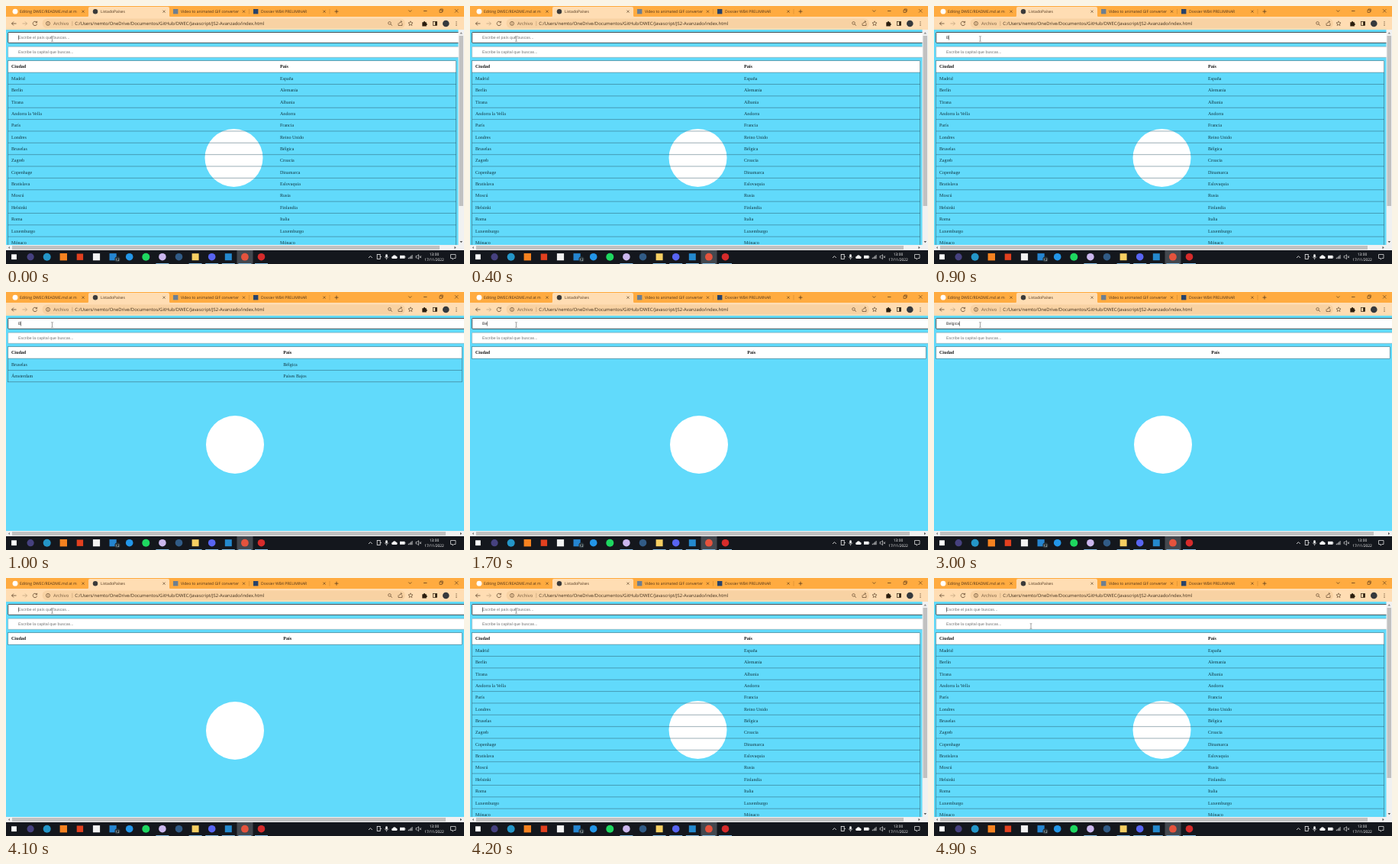
An HTML page that plays this animation: 600 px wide and 338 px high, repeating every 5 s.

```html
<!DOCTYPE html>
<html lang="es">
<head>
<meta charset="utf-8">
<title>ListadoPaíses</title>
<style>
  html, body { margin: 0; width: 100%; height: 100%; overflow: hidden; background: #61dafb; }
  svg { display: block; width: 600px; height: 338px; text-rendering: geometricPrecision; }
  .ui { font-family: "Open Sans", "Noto Sans", sans-serif; }
  .field { font-family: "Liberation Sans", Arial, sans-serif; font-size: 5.28px; }
  .cell { font-family: "Liberation Serif", "Times New Roman", serif; font-size: 6.05px; }
</style>
</head>
<body>
<svg id="stage" viewBox="0 0 600 338" xmlns="http://www.w3.org/2000/svg">
  <g id="page"></g>
  <g id="input"></g>
  <g id="chrome"></g>
  <g id="taskbar"></g>
  <g id="mouse" fill="none" stroke="#555" stroke-width=".55">
    <path d="M-1.3-3.4Q0-3.4 0-2.8Q0-3.4 1.3-3.4M0-2.8V2.8M-1.3 3.4Q0 3.4 0 2.8Q0 3.4 1.3 3.4"/>
  </g>
</svg>
<script>
const NS = "http://www.w3.org/2000/svg";
const LOOP = 5000;
const $ = id => document.getElementById(id);

function add(parent, tag, attrs, content) {
  const el = document.createElementNS(NS, tag);
  for (const key in attrs) el.setAttribute(key, attrs[key]);
  if (content !== undefined) el.textContent = content;
  parent.appendChild(el);
  return el;
}
const rect = (g, x, y, width, height, fill, more) =>
  add(g, "rect", { x, y, width, height, fill, ...more });
const disc = (g, cx, cy, r, fill, more) => add(g, "circle", { cx, cy, r, fill, ...more });
const label = (g, x, y, content, cls, more) => add(g, "text", { x, y, class: cls, ...more }, content);
const line = (g, d, stroke, width = 0.7) =>
  add(g, "path", { d, stroke, fill: "none", "stroke-width": width });

const CITIES = [
  ["Madrid", "España"], ["Berlín", "Alemania"], ["Tirana", "Albania"],
  ["Andorra la Vella", "Andorra"], ["París", "Francia"], ["Londres", "Reino Unido"],
  ["Bruselas", "Bélgica"], ["Zagreb", "Croacia"], ["Copenhage", "Dinamarca"],
  ["Bratislava", "Eslovaquia"], ["Moscú", "Rusia"], ["Helsinki", "Finlandia"],
  ["Roma", "Italia"], ["Luxemburgo", "Luxemburgo"], ["Mónaco", "Mónaco"]
];
const LISTS = {
  all: CITIES,
  some: [["Bruselas", "Bélgica"], ["Ámsterdam", "Países Bajos"]],
  none: []
};

function scrollbars(g, tall, right) {
  rect(g, 0, 313, 600, 7, "#f1f1f1");
  rect(g, 8, 314, tall ? 560 : 568, 5, "#c1c1c1");
  add(g, "path", { d: "M5 314.7v3.6l-2.2-1.8z", fill: "#888" });
  add(g, "path", { d: `M${right - 5} 314.7v3.6l2.2-1.8z`, fill: "#555" });
  if (!tall) return;
  rect(g, 592.5, 31, 7.5, 282, "#f1f1f1");
  rect(g, 593.5, 39, 5.5, 223, "#c1c1c1");
  add(g, "path", { d: "M594.5 36.5h3.6l-1.8-2.2z", fill: "#888" });
  add(g, "path", { d: "M594.5 308h3.6l-1.8 2.2z", fill: "#555" });
}

function buildPage(name) {
  const rows = LISTS[name], tall = name === "all";
  const right = tall ? 592.5 : 600;
  const width = tall ? 587 : 594.5;
  const second = tall ? 359 : 363.3;
  const rowH = 15.36, left = 2.7, top = 71.8, ink = "#12343f";
  const g = add($("page"), "g", {});
  rect(g, 0, 31, 600, 289, "#61dafb");
  disc(g, tall ? 298.5 : 300, tall ? 199 : 200, 38, "#fff");

  rect(g, left, 34.5, 640, 13.8, "#fff", { rx: 0.9, stroke: "#1c1c1c", "stroke-width": 0.75 });
  rect(g, left, 53.3, 640, 14, "#fff", { rx: 0.7, stroke: "#909090", "stroke-width": 0.45 });
  label(g, 16, 62, "Escribe la capital que buscas...", "field", { fill: "#757575" });

  rect(g, left, top, width, rowH, "#fff");
  const bold = { fill: "#111", "font-weight": 700 };
  label(g, 7, 81.3, "Ciudad", "cell", bold);
  label(g, second, 81.3, "País", "cell", bold);
  rows.forEach((row, i) => {
    const y = top + (i + 1) * rowH;
    label(g, 7, y + 9.7, row[0], "cell", { fill: ink });
    label(g, second, y + 9.7, row[1], "cell", { fill: ink });
    line(g, `M${left} ${y}h${width}`, "#24505f", 0.45);
  });
  rect(g, left, top, width, rowH * (rows.length + 1), "none",
    { stroke: "#2c464f", "stroke-width": 0.45 });
  scrollbars(g, tall, right);
  return g;
}

function buildBrowser() {
  const g = $("chrome"), ink = "#4a321a", bar = "#ffddb3";
  rect(g, 0, 0, 600, 15, "#ffab40");
  rect(g, 0, 14, 600, 17, bar);
  add(g, "path", { d: "M106 14.5q2 0 2-2V3q0-2 2-2h102q2 0 2 2v9.5q0 2 2 2z", fill: bar });

  const tabs = [
    [18, "Editing DWEC/README.md at m"], [124, "ListadoPaíses"],
    [229, "Video to animated GIF converter"], [334, "Dossier WB4 PRELIMINAR"]
  ];
  tabs.forEach(([x, title], i) => {
    label(g, x, 9, title, "ui", { fill: ink, "font-size": 5.05 });
    const cx = [101, 207, 311.5, 417][i];
    line(g, `M${cx - 1.6} 5.6l3.2 3.2m0-3.2l-3.2 3.2`, ink, 0.6);
  });
  disc(g, 12, 7.2, 3.4, "#fff");
  disc(g, 117, 7.2, 3.2, "#3a3a3a");
  rect(g, 219, 4, 6.4, 6.4, "#6d7f91");
  rect(g, 324, 4, 6.4, 6.4, "#27436b");
  line(g, "M318.5 4v6.5M424 4v6.5", "#c5812a", 0.5);
  line(g, "M430.5 7.2h5M433 4.7v5", ink);

  line(g, "M527.3 5.5l2 2 2-2M547 6.5h4.5", ink);
  line(g, "M568 5.2h3.2v3.2h-3.2zM569 5v-1h3.3v3.2h-1M588 4.2l4.4 4.4m0-4.4l-4.4 4.4", ink, 0.6);

  line(g, "M13.5 23h-6m2.5-2.5L7.5 23l2.5 2.5", ink);
  line(g, "M21.5 23h6m-2.5-2.5l2.5 2.5-2.5 2.5", "#b99b78");
  line(g, "M40 21.2a2.7 2.7 0 1 0 .6 2.3M40.6 19.8v2h-2", ink);
  rect(g, 47.5, 16.5, 475.5, 12.6, "#f8d2a3", { rx: 6.3 });
  disc(g, 55, 22.9, 2.5, "none", { stroke: ink, "stroke-width": 0.6 });
  line(g, "M55 22.4v1.9M55 21.2v.6", ink, 0.6);
  label(g, 62, 25, "Archivo", "ui", { fill: "#75593b", "font-size": 5.85 });
  line(g, "M86.8 19.8v6.2", "#b5946c", 0.5);
  label(g, 90.3, 25,
    "C:/Users/nemto/OneDrive/Documentos/GitHub/DWEC/Javascript/JS2-Avanzado/index.html",
    "ui", { fill: "#3d2c1a", "font-size": 5.9 });

  disc(g, 502.5, 22.4, 1.8, "none", { stroke: ink, "stroke-width": 0.6 });
  line(g, "M503.8 23.7l2 2", ink);
  line(g, "M514 22.5v3h5v-3M515 23q.3-2.4 3.5-2.4m-1.3-1.4l1.5 1.4-1.5 1.4", ink, 0.6);
  line(g, "M530 19.8l.9 2 2.1.2-1.6 1.4.5 2.1-1.9-1.1-1.9 1.1.5-2.1-1.6-1.4 2.1-.2z", ink, 0.6);
  add(g, "path", { d: "M545.3 21.2h1.7a1.1 1.1 0 0 1 2.2 0h1.6v1.7a1.1 1.1 0 0 1 0 2.2v1.4h-5.5z", fill: "#2b1d0d" });
  rect(g, 559.5, 20.4, 5, 5, "none", { stroke: "#2b1d0d", "stroke-width": 0.7 });
  rect(g, 562.2, 20.4, 2.3, 5, "#2b1d0d");
  disc(g, 576.3, 23, 4.3, "#35393d");
  [20.8, 23, 25.2].forEach(y => disc(g, 590, y, 0.6, ink));
}

function buildTaskbar() {
  const g = $("taskbar"), white = "#f2f2f2";
  rect(g, 0, 320, 600, 18, "#14171d");
  rect(g, 302.5, 320, 21, 18, "#43484f");
  const icons = [
    ["s", "#fff", 3.4], ["c", "#46417f", 4.6], ["c", "#2496c8", 5], ["s", "#f58220", 4.7],
    ["s", "#e2401f", 4.2], ["s", "#f2f2f2", 4.6], ["s", "#2585d0", 4.6], ["c", "#2396e8", 4.8],
    ["c", "#1ed760", 5], ["c", "#cbb7ee", 4.8], ["c", "#315b86", 4.8], ["s", "#f6cf62", 4.5],
    ["c", "#5865f2", 4.8], ["s", "#2489ce", 4.5], ["c", "#e5533d", 4.9], ["c", "#d52b2b", 4.8]
  ];
  icons.forEach(([shape, color, r], i) => {
    const x = 10.5 + i * 21.6;
    if (shape === "c") disc(g, x, 328.7, r, color);
    else rect(g, x - r, 328.7 - r, 2 * r, 2 * r, color);
    if ([9, 11, 12, 13, 14, 15].includes(i)) rect(g, x - 8.5, 337, 17, 1, "#82b9df");
  });
  disc(g, 146, 331.8, 3.6, "#263238");
  label(g, 146, 333.5, "12", "ui", { fill: "#fff", "font-size": 4.6, "text-anchor": "middle" });

  line(g, "M475 330l2.4-2.4 2.4 2.4", white, 0.8);
  rect(g, 486.2, 325.5, 4, 6, "none", { stroke: white, "stroke-width": 0.8 });
  line(g, "M490.2 328.5h1.8", white);
  rect(g, 497.2, 325.2, 2.6, 4.4, white, { rx: 1.3 });
  line(g, "M496 328.5q2.5 4.4 5 0M498.5 330.7v1.6", white, 0.6);
  add(g, "path", { d: "M506 331a1.7 1.7 0 0 1 .6-3.2 2.4 2.4 0 0 1 4.5 0 1.7 1.7 0 0 1 .7 3.2z", fill: white });
  rect(g, 516, 326.8, 6.5, 4, white);
  rect(g, 522.5, 328, 0.8, 1.6, white);
  line(g, "M527.3 331.2v-1.4m1.6 1.4v-2.6m1.6 2.6v-3.8m1.6 3.8v-5", white, 0.8);
  line(g, "M537 327.5h1.5l2-1.8v6l-2-1.8H537zM541.8 327.3l2.2 2.8m0-2.8l-2.2 2.8", white, 0.6);
  const clock = { fill: "#fff", "font-size": 4.85, "font-weight": 500, "text-anchor": "middle" };
  label(g, 561, 326.6, "13:00", "ui", clock);
  label(g, 561, 334.2, "17/11/2022", "ui", clock);
  line(g, "M582.5 325.5h6.5v5h-2.3l-1.6 1.7v-1.7h-2.6z", white, 0.7);
}

const pages = {};
for (const name in LISTS) pages[name] = buildPage(name);
buildBrowser();
buildTaskbar();
const hint = label($("input"), 16, 43.2, "Escribe el país que buscas...", "field", { fill: "#757575" });
const typed = label($("input"), 16, 43.2, "", "field", { fill: "#333" });
const caret = rect($("input"), 0, 38.4, 0.5, 6.2, "#111");

// Each track lists [start in ms, value].
const TEXT = [
  [0, ""], [700, "B"], [1500, "Be"], [1900, "Bel"], [2100, "Belg"], [2500, "Belgi"],
  [2700, "Belgic"], [2900, "Belgica"], [3300, "Belgic"], [3400, "Belgi"], [3500, "Belg"],
  [3600, "Bel"], [3800, "Be"], [3900, "B"], [4000, ""]
];
const LIST = [[0, "all"], [1000, "some"], [1600, "none"], [4200, "all"]];
const CARET = [[0, 1], [300, 0], [700, 1], [4400, 0], [4900, 1]];
const MOUSE = [[0, [60.5, 43]], [4800, [98, 54]], [4900, [127, 63]]];
const at = (track, t) => track.filter(step => step[0] <= t).pop()[1];

function draw(t) {
  const text = at(TEXT, t), list = at(LIST, t);
  for (const name in pages) pages[name].style.display = name === list ? "" : "none";
  hint.style.display = text ? "none" : "";
  typed.textContent = text;
  caret.setAttribute("x", 16 + (text ? typed.getComputedTextLength() : 0));
  caret.style.opacity = at(CARET, t);
  $("mouse").setAttribute("transform", `translate(${at(MOUSE, t)})`);
}

const start = performance.now();
function tick() {
  draw((performance.now() - start) % LOOP);
  requestAnimationFrame(tick);
}
tick();
</script>
</body>
</html>
```
